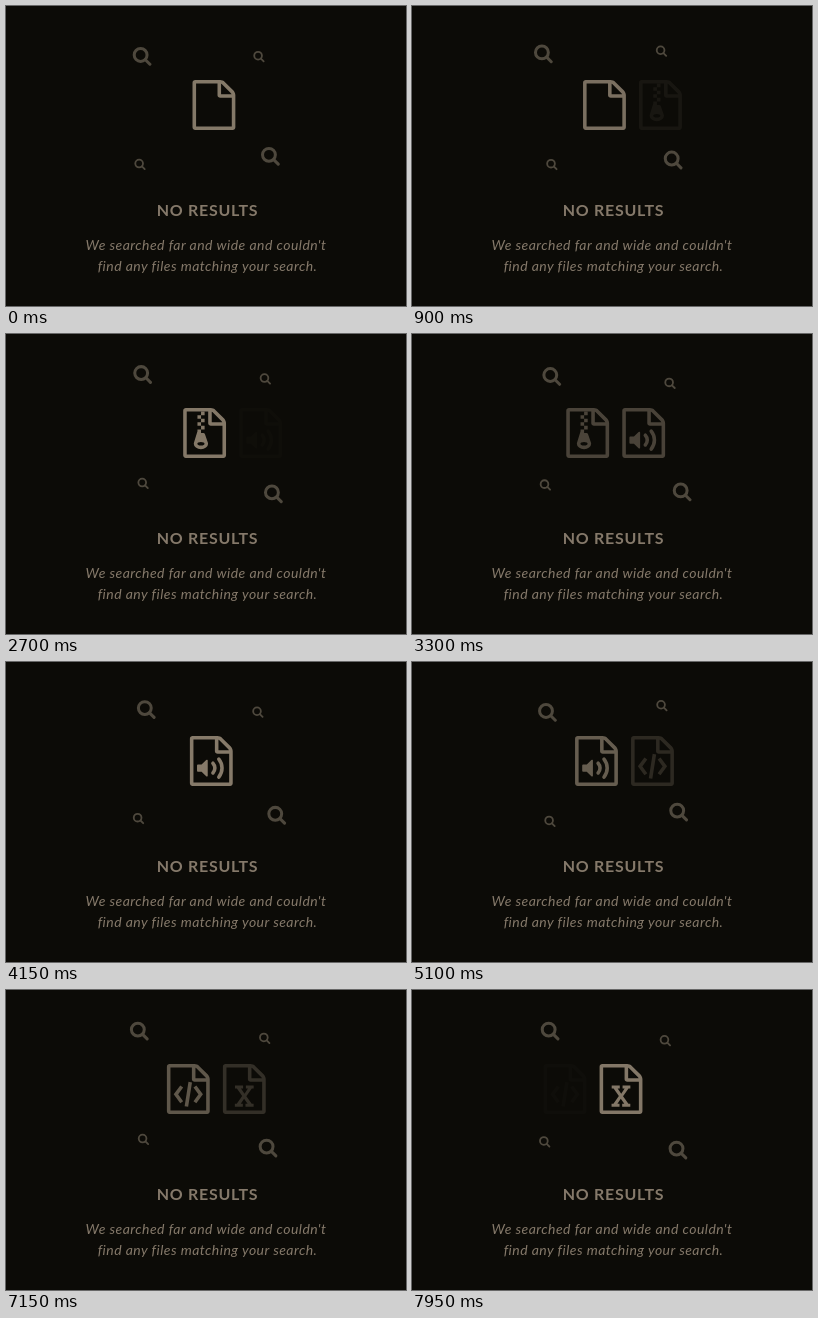
Animation, 400 px wide and 300 px high, one loop 8000 ms. Source, as an HTML page:

```html
<!DOCTYPE html>
<html lang="en">
<head>
<meta charset="utf-8">
<title>No results</title>
<style>
  html, body { margin: 0; width: 100%; height: 100%; overflow: hidden; background: #0c0b07; }
  svg { display: block; width: 100vw; height: 100vh; }
  text { font-family: Lato, sans-serif; text-anchor: middle; fill: #85796a; }
  .title { font-size: 16px; font-weight: 700; letter-spacing: .7px; }
  .note { font-size: 14px; font-style: italic; letter-spacing: .45px; }
  .file { fill: #877b6a; }
  .line { fill: none; stroke: #877b6a; stroke-width: 128; }
  .lens { fill: none; stroke: #857b6a; stroke-width: 270; stroke-linecap: round; opacity: .55; }
</style>
</head>
<body>
<svg viewBox="0 0 400 300">
  <defs>
    <path id="page" fill-rule="evenodd" d="M1468 380q28 28 48 76t20 88v1152q0 40-28 68t-68 28H96q-40 0-68-28t-28-68V96q0-40 28-68t68-28h896q40 0 88 20t76 48zM1024 136v376h376q-10-29-22-41l-313-313q-12-12-41-22zM1408 1664V640H992q-40 0-68-28t-28-68V128H128v1536z"/>
    <g id="lens">
      <circle cx="704" cy="704" r="576"/>
      <path d="M1130 1130 1536 1536"/>
    </g>
  </defs>
  <g id="lenses"></g>
  <g id="files">
    <g class="file"><use href="#page"/></g>
    <g class="file">
      <use href="#page"/>
      <path d="M640 128h128v128h-128zM512 256h128v128h-128zM640 384h128v128h-128zM512 512h128v128h-128zM640 640h128v128h-128z"/>
      <path fill-rule="evenodd" d="M512 768h128v128h79q47 0 62 47l103 289q8 27 8 52a256 192 0 0 1-512 0q0-25 8-52l124-396zM508 1284a128 64 0 0 0 256 0a128 64 0 0 0-256 0z"/>
    </g>
    <g class="file">
      <use href="#page"/>
      <path d="M620 850q20 8 20 30v544q0 22-20 30-18 6-35-7l-166-167H288q-32 0-32-32v-192q0-32 32-32h131l166-167q16-15 35-7z"/>
      <path class="line" stroke-linecap="round" d="M826 977q70 76 70 174t-70 174M1037 829q115 142 115 322t-115 322"/>
    </g>
    <g class="file">
      <use href="#page"/>
      <path class="line" d="M531 806 324 1088 531 1370M1005 806 1212 1088 1005 1370M837 650 699 1526"/>
    </g>
    <g class="file">
      <use href="#page"/>
      <path d="M429 1536v-107h68l194-283-189-272h-68V767h290v107h-76l128 190 122-190h-74V767h279v107h-67l-195 282 192 273h68v107H810v-107h76l-126-188-120 188h75v107z"/>
    </g>
  </g>
  <text class="title" x="201.6" y="210">NO RESULTS</text>
  <text class="note" x="200" y="244">We searched far and wide and couldn't</text>
  <text class="note" x="201.5" y="265">find any files matching your search.</text>
</svg>
<script>
  const LOOP = 8000, STEP = 50, SLIDE = 2000;
  const REST_X = 182.1, GAP = 56, UNIT = 1 / 1792;

  // Centre, font size, start angle and signed period in seconds
  const orbits = [
    { x: 135.7, y: 45.4, size: 20, angle: 86, period: 5 },
    { x: 254.4, y: 45.8, size: 12, angle: 107, period: 4 },
    { x: 137, y: 154.4, size: 12, angle: 127, period: -4.5 },
    { x: 266, y: 155, size: 20, angle: 251, period: -5.5 }
  ];
  const RADIUS = 5;

  const files = [...document.querySelectorAll('#files > g')];
  const lenses = orbits.map(() => {
    const el = document.createElementNS('http://www.w3.org/2000/svg', 'use');
    el.setAttribute('href', '#lens');
    el.setAttribute('class', 'lens');
    document.getElementById('lenses').append(el);
    return el;
  });

  const bezier = (a, b, s) => 3 * (1 - s) * s * ((1 - s) * a + s * b) + s ** 3;
  const smooth = v => v * v * (3 - 2 * v);

  function ease(u) {
    let lo = 0, hi = 1;
    for (let i = 0; i < 24; i++) {
      const mid = (lo + hi) / 2;
      if (bezier(.37, .54, mid) < u) lo = mid; else hi = mid;
    }
    return bezier(0, .85, lo);
  }

  const place = (el, x, y, size) =>
    el.setAttribute('transform', `translate(${x} ${y}) scale(${size * UNIT})`);

  function draw(ms) {
    const p = ms / SLIDE - .15, n = Math.floor(p);
    const scroll = n + ease(p - n);
    files.forEach((el, i) => {
      const d = i - scroll;
      place(el, REST_X + GAP * d, 74, 50);
      el.setAttribute('opacity', smooth(Math.max(0, 1 - Math.abs(d))));
    });
    orbits.forEach((o, i) => {
      const a = o.angle * Math.PI / 180 + ms / 1000 / o.period * 2 * Math.PI;
      const half = 832 * UNIT * o.size;
      place(lenses[i], o.x + RADIUS * Math.cos(a) - half, o.y + RADIUS * Math.sin(a) - half, o.size);
    });
  }

  const start = performance.now();
  function tick() {
    const ms = (performance.now() - start) % LOOP;
    draw(Math.floor(ms / STEP) * STEP);
    requestAnimationFrame(tick);
  }
  tick();
</script>
</body>
</html>
```
